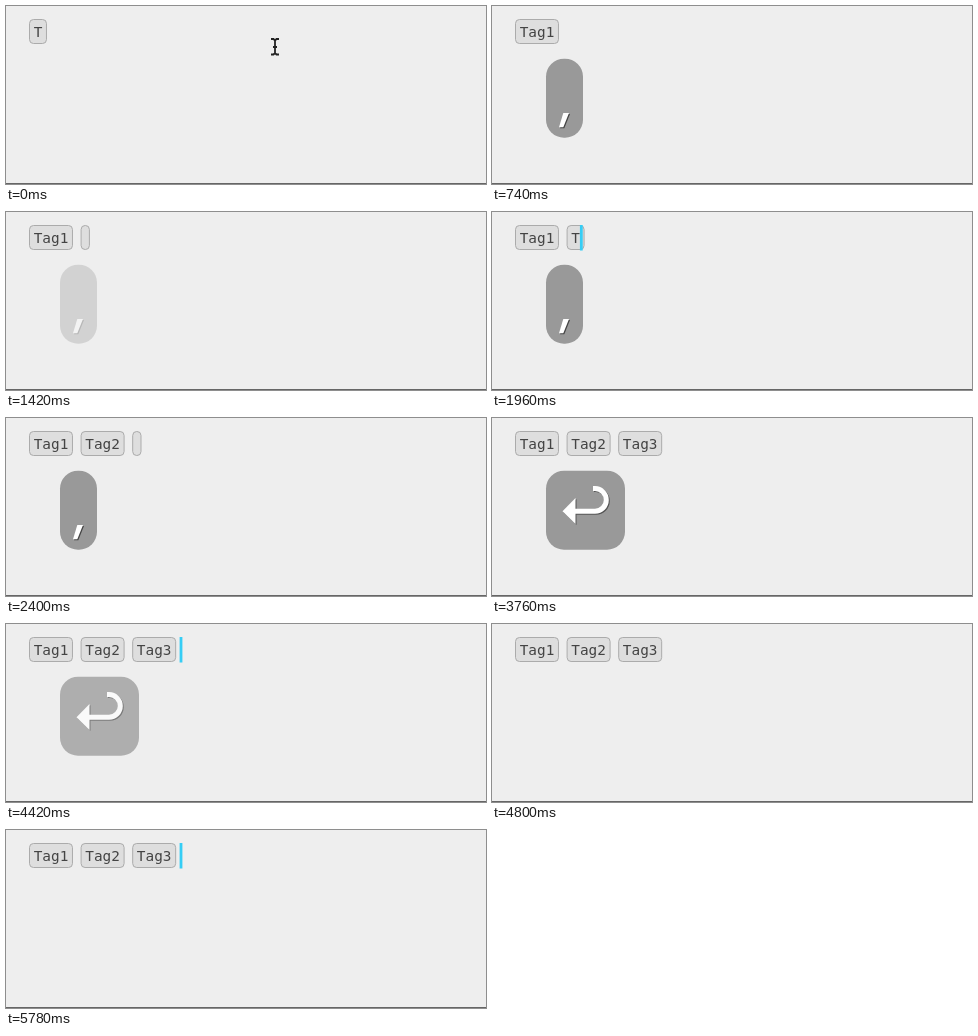
Recreate the animation shown at these times as an HTML page. Size 480x178 px, loop 6040 ms.

```html
<!DOCTYPE html>
<html lang="en">
<head>
<meta charset="utf-8">
<title>Tag input</title>
<style>
  html, body { margin: 0; width: 100%; height: 100%; overflow: hidden; background: #eee; }
  svg { display: block; width: 100%; height: 100%; }
  text { font: 14.4px "DejaVu Sans Mono", monospace; fill: #444; white-space: pre; }
  .tag rect { fill: #dedede; stroke: #ababab; }
  .key > rect { fill: #999; }
</style>
</head>
<body>
<svg viewBox="0 0 480 178" xmlns="http://www.w3.org/2000/svg">
  <defs>
    <polygon id="comma" points="71.3,107 77,107 71.3,121.3 67,121.3"/>
    <g id="return">
      <path d="M101 70.6H103A11.3 11.3 0 0 1 103 93.2H82" fill="none" stroke="currentColor" stroke-width="5"/>
      <polygon points="70.5,93.2 83.5,80 83.5,106" fill="currentColor"/>
    </g>
  </defs>
  <rect width="480" height="178" fill="#eee"/>
  <rect y="177" width="480" height="1" fill="#666"/>
  <g id="tags"></g>
  <rect id="caret" y="13" width="2.8" height="25.5" fill="#35cdf5"/>
  <g id="commaKey" class="key">
    <rect x="54" y="52.7" width="37" height="79" rx="18"/>
    <use href="#comma" x="1" y="1" fill="#444"/>
    <use href="#comma" fill="#fff"/>
  </g>
  <g id="returnKey" class="key">
    <rect x="54" y="52.7" width="79" height="79" rx="18"/>
    <use href="#return" x="1" y="1" color="#555"/>
    <use href="#return" color="#fff"/>
  </g>
  <path id="pointer" d="M265 33H267.5L269 34.5L270.5 33H273M269 34V47M265 48.5H267.5L269 47L270.5 48.5H273M267 41H271"
        fill="none" stroke="#222" stroke-width="1.8"/>
</svg>
<script>
const LOOP = 6040;
const LEFT = 23, TOP = 13, PITCH = 51.6, PAD = 4.65, CHAR = 8.67;
const CARET_END = 173.6;

// open: when the box appears; typed: when each letter lands
const TAGS = [
  { word: 'Tag1', open: 0, typed: [0, 20, 60, 100] },
  { word: 'Tag2', open: 940, typed: [1960, 1980, 2000, 2020] },
  { word: 'Tag3', open: 2060, typed: [3160, 3180, 3200, 3220] }
];
const CARET_ON = [[20, 480], [940, 1400], [1760, 2340], [2680, 3000],
                  [3160, 3520], [4420, 4760], [5100, 5440], [5780, LOOP]];
const COMMITTED = 4400;

// [shown, fade start, fade length]
const PRESSES = {
  commaKey: [[740, 1400, 60], [1960, 2600, 100]],
  returnKey: [[3760, 4400, 160]]
};

const $ = id => document.getElementById(id);

function make(name, attrs, parent) {
  const el = document.createElementNS('http://www.w3.org/2000/svg', name);
  for (const k in attrs) el.setAttribute(k, attrs[k]);
  return parent.appendChild(el);
}

TAGS.forEach((tag, i) => {
  tag.x = LEFT + i * PITCH;
  tag.g = make('g', { class: 'tag' }, $('tags'));
  tag.box = make('rect', { x: tag.x + 0.5, y: TOP + 0.5, height: 24, rx: 4 }, tag.g);
  tag.label = make('text', { x: tag.x + PAD, y: 31 }, tag.g);
});

const show = (el, on) => el.setAttribute('visibility', on ? 'visible' : 'hidden');

function pressAlpha(presses, t) {
  const press = presses.find(([from, fade, len]) => t >= from && t < fade + len);
  if (!press) return 0;
  const [, fade, len] = press;
  return t < fade ? 1 : Math.max(0, 1 - (t - fade + 20) / len);
}

function draw(t) {
  let caretX = CARET_END;
  for (const tag of TAGS) {
    const open = t >= tag.open;
    const count = tag.typed.filter(at => t >= at).length;
    show(tag.g, open);
    tag.box.setAttribute('width', 2 * PAD + count * CHAR - 1);
    tag.label.textContent = tag.word.slice(0, count);
    if (open && t < COMMITTED) caretX = tag.x + PAD + count * CHAR;
  }
  $('caret').setAttribute('x', caretX);
  show($('caret'), CARET_ON.some(([a, b]) => t >= a && t < b));
  for (const id in PRESSES) $(id).setAttribute('opacity', pressAlpha(PRESSES[id], t));
  show($('pointer'), t < 20);
}

const start = performance.now();
function tick() {
  draw((performance.now() - start) % LOOP);
  requestAnimationFrame(tick);
}
draw(0);
requestAnimationFrame(tick);
</script>
</body>
</html>
```
